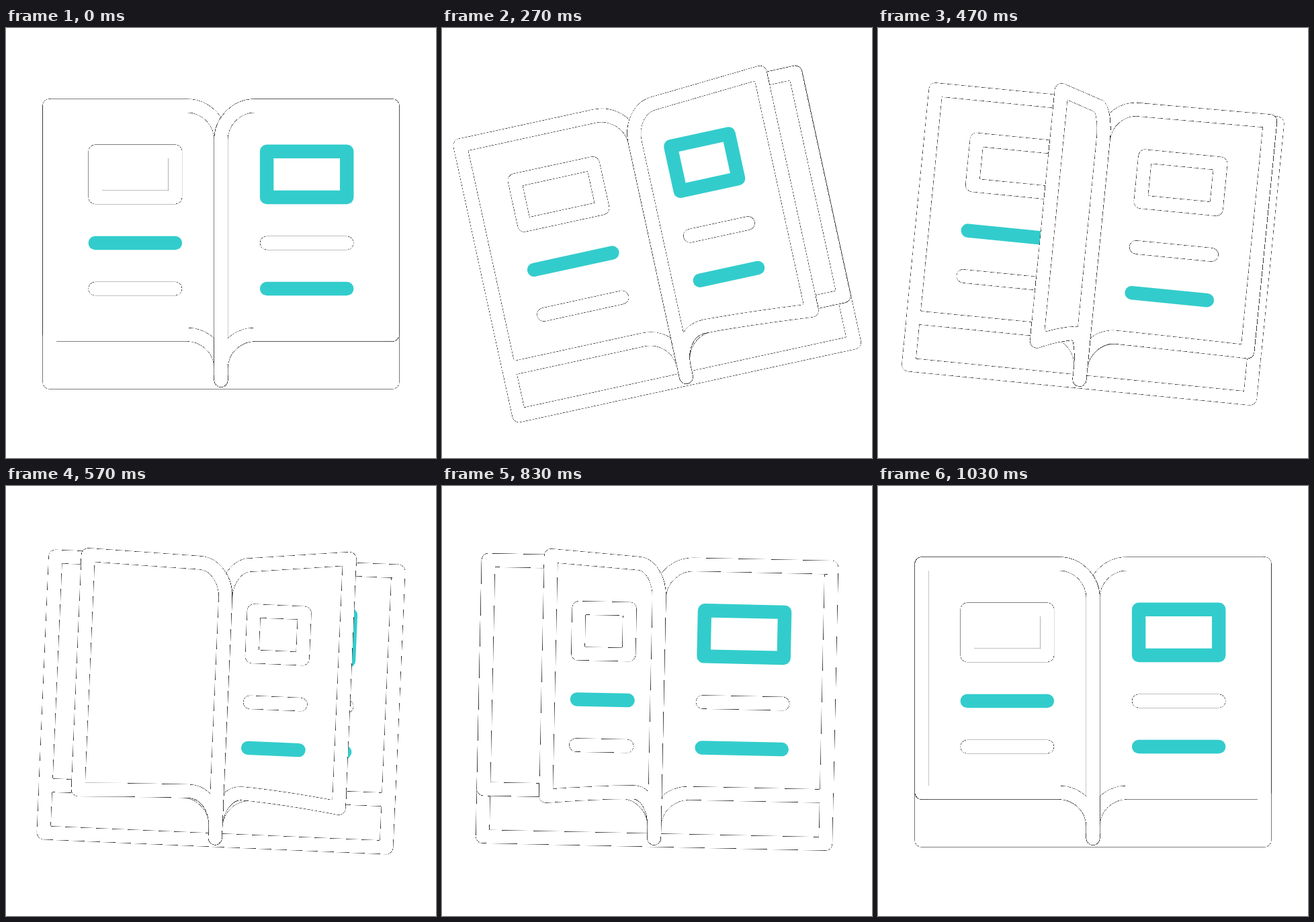
Write an HTML page with a canvas that moves like this. It is 640 by 640 pixels and loops after 1670 ms.

```html
<!DOCTYPE html>
<html lang="en">
<head>
<meta charset="utf-8">
<title>Book</title>
<style>
html, body { margin: 0; width: 100%; height: 100%; overflow: hidden; background: #fff; }
canvas { display: block; }
</style>
</head>
<body>
<canvas id="stage" width="640" height="640"></canvas>
<script>
const ctx = document.getElementById('stage').getContext('2d', { willReadFrequently: true });
const LOOP = 1670, LAST = 31, UNIT = 640 / 94, MID = 0.22;
const BLACK = '#000', WHITE = '#fff', TEAL = '#33cccc';

// Colours of picture box, first line and second line
const LEFT_FACE = [BLACK, TEAL, BLACK];
const RIGHT_FACE = [TEAL, BLACK, TEAL];
const NEXT_FACE = [BLACK, BLACK, TEAL];

// Tilt keys: step, degrees
const TILT = [[0, 0], [8, -12.3], [15, 6.7], [20, -5.3], [24, 1.3], [LAST, 0]];

const smooth = x => x * x * (3 - 2 * x);

function tiltAt(step) {
  const k = Math.max(1, TILT.findIndex(key => key[0] >= step));
  const [t0, a] = TILT[k - 1], [t1, b] = TILT[k];
  return a + (b - a) * smooth((step - t0) / (t1 - t0));
}

// 1 lies on the right, -1 on the left
function turnAt(step, start, span) {
  const x = Math.min(1, Math.max(0, (step - start) / span));
  return 1 - 2 * smooth(x ** 1.2);
}

function stroke(path, color) {
  ctx.strokeStyle = color;
  ctx.stroke(path);
}

function fill(path) {
  ctx.fillStyle = WHITE;
  ctx.fill(path);
}

function drawFace([box, line1, line2], spread) {
  const a = 10 * spread, b = 27.5 * spread;
  const frame = new Path2D();
  frame.rect(Math.min(a, b), -20, Math.abs(b - a), 10);
  fill(frame);
  stroke(frame, box);
  [line1, line2].forEach((color, i) => {
    const line = new Path2D();
    line.moveTo(a, i * 10);
    line.lineTo(b, i * 10);
    stroke(line, color);
  });
}

function drawPage(turn, front, back, { width = 37.5, loose = true } = {}) {
  const lift = Math.min(8 * (1 - turn), 3.55 * (1 + turn));
  const x = v => v * turn;
  const page = new Path2D();
  page.moveTo(0, 30);
  page.lineTo(0, -22.5);
  page.bezierCurveTo(0, -26.64, x(3.36), -30, x(7.5), -30);
  page.lineTo(x(width), -30 - lift);
  page.lineTo(x(width), 20 + lift);
  page.quadraticCurveTo(x(20), 20 + lift * 0.2, x(7.5), 20);
  page.bezierCurveTo(x(3.36), 20, 0, 23.36, 0, 27.5);
  fill(page);
  // The front folds away before the back comes into view
  if (front && turn > MID) drawFace(front, (turn - MID) / (1 - MID));
  if (back && turn < 0) drawFace(back, turn);
  // The light pass leaves a hairline where a loose page crosses dark parts
  if (loose) stroke(page, WHITE);
  stroke(page, BLACK);
}

// Open at the top, where the pages form the edge
function drawCover() {
  const cover = new Path2D();
  cover.moveTo(-37.5, -30);
  cover.lineTo(-37.5, 30.43);
  cover.lineTo(37.5, 30.43);
  cover.lineTo(37.5, -30);
  stroke(cover, BLACK);
}

// Solid black turns white, so only the soft rims of the strokes remain
function hollow() {
  const image = ctx.getImageData(0, 0, 640, 640), d = image.data;
  for (let i = 0; i < d.length; i += 4) {
    if (d[i] < 30 && d[i + 1] < 30) d[i] = d[i + 1] = d[i + 2] = 255;
  }
  ctx.putImageData(image, 0, 0);
}

function draw(step) {
  ctx.setTransform(1, 0, 0, 1, 0, 0);
  ctx.fillStyle = WHITE;
  ctx.fillRect(0, 0, 640, 640);
  ctx.translate(320, 320);
  ctx.rotate(tiltAt(step) * Math.PI / 180);
  ctx.scale(UNIT, UNIT);
  ctx.lineWidth = 3;
  ctx.lineCap = ctx.lineJoin = 'round';

  drawCover();
  drawPage(-1, null, LEFT_FACE, { loose: false });
  drawPage(1, RIGHT_FACE, null, { loose: false });

  const turn1 = turnAt(step, 4, 15.5), turn2 = turnAt(step, 11.8, 17.2);
  const first = () => drawPage(turn1, RIGHT_FACE, null);
  const second = () => drawPage(turn2, NEXT_FACE, LEFT_FACE, { width: 37.45 });
  (turn2 > MID ? [second, first] : [first, second]).forEach(paint => paint());
  hollow();
}

let start, shown = -1;
function tick(now) {
  start ??= now;
  const time = (now - start) % LOOP;
  const step = Math.min(LAST, Math.floor((time + 3.4) * 0.03));
  if (step !== shown) draw(shown = step);
  requestAnimationFrame(tick);
}
draw(0);
requestAnimationFrame(tick);
</script>
</body>
</html>
```
